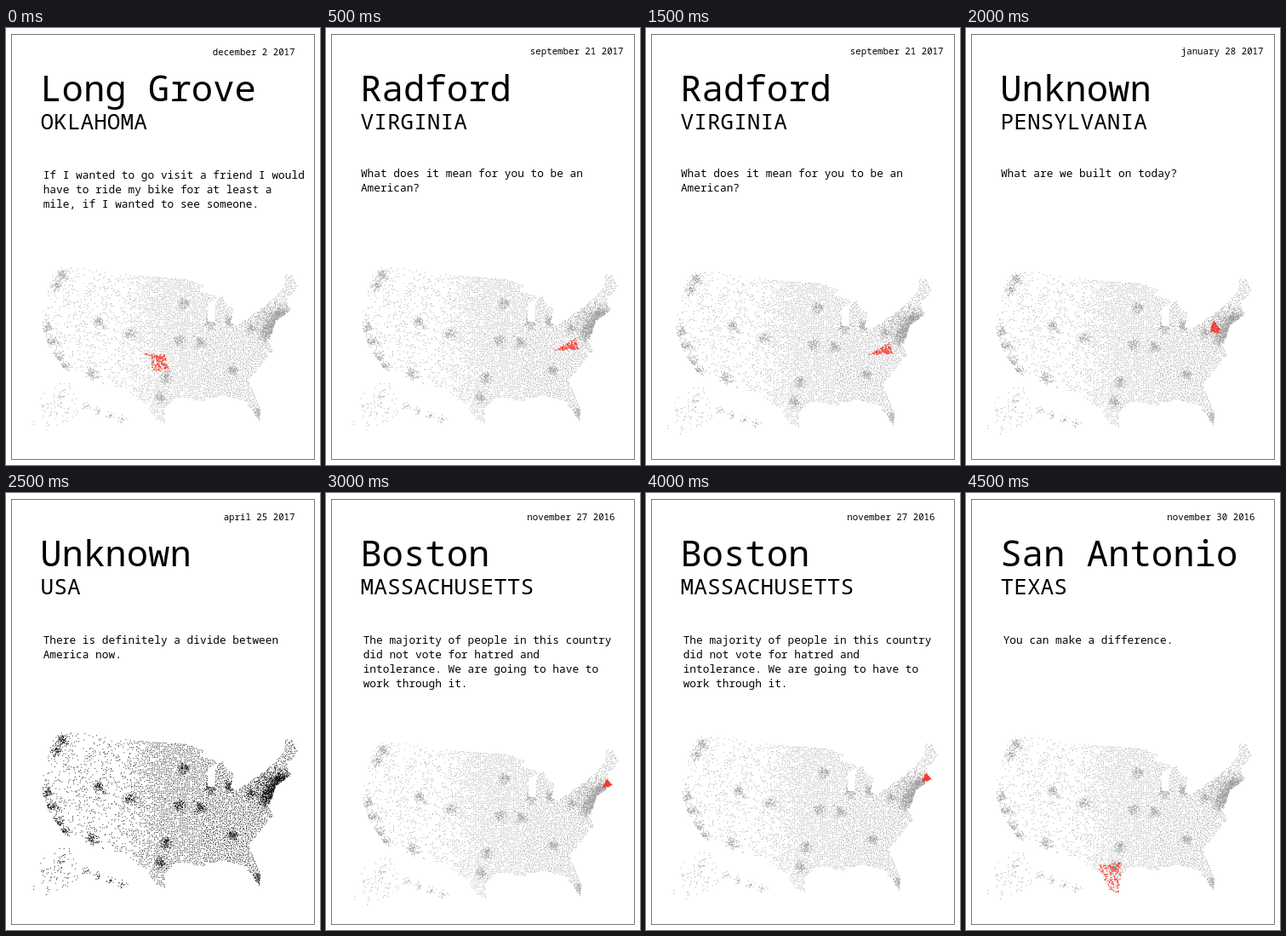
These frames come from a looping animation (369x513 px, 5 s). An HTML page with a canvas:

```html
<!DOCTYPE html>
<html lang="en">
<head>
<meta charset="utf-8">
<title>Map of voices</title>
<style>
  html, body { margin: 0; width: 100%; height: 100%; overflow: hidden; background: #fff; }
  #stage { position: relative; width: 369px; height: 513px; }
  canvas, svg { position: absolute; left: 0; top: 0; display: block; }
  text { font-family: "Noto Sans Mono", "DejaVu Sans Mono", monospace; fill: #000; white-space: pre; }
  #date { font-size: 10.75px; text-anchor: end; }
  #city { font-size: 42.3px; }
  #state { font-size: 26.1px; }
  #quote { font-size: 12.8px; }
</style>
</head>
<body>
<div id="stage">
  <canvas id="map" width="369" height="513"></canvas>
  <svg width="369" height="513" viewBox="0 0 369 513">
    <rect x="6.5" y="7.5" width="356" height="499" fill="none" stroke="#777"/>
    <text id="date"></text>
    <text id="city" x="40.2" y="86"></text>
    <text id="state" x="40.6" y="118.5"></text>
    <g id="quote"><text></text><text></text><text></text><text></text></g>
  </svg>
</div>
<script>
const W = 369, H = 513, STEP_MS = 500;

const LAND = new Path2D(`M70 278 L150 291 212 295 234 303 226 309 252 316 237 322 237 345 246 346
  246 328 249 318 255 315 262 327 267 330 264 346 272 349 298 331 314 318 327 304 328 291 334 288
  343 303 329 321 335 331 317 344 309 368 314 378 285 414 299 447 298 462 280 438 254 431 231 438
  200 433 186 447 187 464 178 460 160 440 140 424 100 414 68 400 48 370 43 350 44 330 53 290Z`);

const CITIES = [
  [66, 290], [60, 303], [48, 352], [55, 368], [60, 387], [68, 398], [109, 345], [146, 359],
  [102, 406], [209, 323], [203, 367], [188, 411], [182, 434], [228, 369], [240, 346],
  [264, 344], [265, 402], [288, 352], [297, 454]
];

const ISLANDS = [[64, 431, 6], [51, 453, 9], [72, 448, 7]];

// Each region: corner points and dot count.
const REGIONS = {
  oklahoma: ["M162 382 L186 383 193 404 172 402 171 386Z", 170],
  wisconsin: ["M222 333 L240 330 240 342 223 340Z", 110],
  pennsylvania: ["M298 338 L306 349 304 353 294 352Z", 140],
  massachusetts: ["M329 324 L335 331 324 334Z", 120],
  virginia: ["M269 379 L294 364 297 377Z", 130],
  texas: ["M162 432 L191 428 186 464 175 461Z", 170]
};

const VIRGINIA = {
  date: "september 21 2017", city: "Radford", state: "VIRGINIA", region: "virginia", at: [0, 0],
  question: true, quote: ["What does it mean for you to be an", "American?"]
};
const BOSTON = {
  date: "november 27 2016", city: "Boston", state: "MASSACHUSETTS", region: "massachusetts", at: [1, 12],
  quote: ["The majority of people in this country", "did not vote for hatred and",
          "intolerance. We are going to have to", "work through it."]
};

const CARDS = [
  { date: "december 2 2017", city: "Long Grove", state: "OKLAHOMA", region: "oklahoma", at: [0, 0],
    quote: ["If I wanted to go visit a friend I would", "have to ride my bike for at least a",
            "mile, if I wanted to see someone."] },
  VIRGINIA,
  { date: "april 26 2017", city: "Milwaukee", state: "WISCONSIN", region: "wisconsin", at: [-6, 10],
    quote: ["He is looking for whats best for the", "country as a whole."] },
  { ...VIRGINIA, at: [-7, 5] },
  { date: "january 28 2017", city: "Unknown", state: "PENSYLVANIA", region: "pennsylvania", at: [-7, 5],
    question: true, quote: ["What are we built on today?"] },
  { date: "april 25 2017", city: "Unknown", state: "USA", at: [0, 0],
    quote: ["There is definitely a divide between", "America now."] },
  BOSTON,
  VIRGINIA,
  { ...BOSTON, at: [0, 5] },
  { date: "november 30 2016", city: "San Antonio", state: "TEXAS", region: "texas", at: [-7, 5],
    quote: ["You can make a difference."] }
];

function seeded(seed) {
  return () => {
    seed = (seed * 16807) % 2147483647;
    return seed / 2147483647;
  };
}

function layer() {
  const c = document.createElement("canvas");
  c.width = W;
  c.height = H;
  return c.getContext("2d");
}

// Sparse and patchy in the west, an even lattice from the plains eastward.
function density(x, y) {
  const patch = Math.sin(x * 0.21 + 2 * Math.sin(y * 0.13)) * Math.sin(y * 0.17 + x * 0.05);
  const west = 0.21 + 0.17 * patch;
  const ramp = Math.min(1, Math.max(0, (x - 135) / 50));
  return west + ((x > 235 ? 0.92 : 0.8) - west) * ramp;
}

function drawCountry() {
  const g = layer(), rnd = seeded(7919);
  const onLand = (x, y) => g.isPointInPath(LAND, x, y);
  const dot = (x, y) => g.fillRect(x - 0.45, y - 0.45, 0.9, 0.9);
  const spread = r => (rnd() + rnd() + rnd() - 1.5) * 2 * r;
  const cluster = (cx, cy, r, n, clip = true) => {
    for (let i = 0; i < n; i++) {
      const x = cx + spread(r), y = cy + spread(r);
      if (!clip || onLand(x, y)) dot(x, y);
    }
  };
  const gap = 1.95;
  for (let v = 240; v < 470; v += gap) {
    for (let u = 40; u < 346; u += gap) {
      const jitter = u > 150 && u < 230 ? 0.8 : 1.6;
      const x = u + (rnd() - 0.5) * jitter;
      const y = v + (u - 40) * 0.06 + (rnd() - 0.5) * jitter;
      if (rnd() < density(x, y) && onLand(x, y)) dot(x, y);
    }
  }
  CITIES.forEach(([x, y]) => cluster(x, y, 3.4, 85));
  // Northeast corridor, then two island chains at the lower left.
  for (let t = 0; t <= 1; t += 0.1) cluster(327 - 23 * t, 331 + 31 * t, 5, 75);
  cluster(311, 341, 9, 260);
  ISLANDS.forEach(([x, y, r]) => cluster(x, y, r, 34, false));
  for (let i = 0; i < 4; i++) cluster(94 + i * 14.4, 444 + i * 5.2, 2.3, 18, false);
  return g.canvas;
}

function drawRegion([outline, count]) {
  const g = layer(), path = new Path2D(outline), rnd = seeded(count);
  const xy = outline.match(/\d+/g).map(Number);
  const range = k => {
    const v = xy.filter((_, i) => i % 2 === k);
    return [Math.min(...v), Math.max(...v)];
  };
  const [x0, x1] = range(0), [y0, y1] = range(1);
  g.fillStyle = "#f43a2c";
  for (let n = 0; n < count;) {
    const x = x0 + rnd() * (x1 - x0), y = y0 + rnd() * (y1 - y0);
    if (!g.isPointInPath(path, x, y)) continue;
    g.fillRect(x - 0.6, y - 0.6, 1.2, 1.2);
    n++;
  }
  return g.canvas;
}

const byId = id => document.getElementById(id);
const ctx = byId("map").getContext("2d");
const country = drawCountry();
const regions = {};
for (const name in REGIONS) regions[name] = drawRegion(REGIONS[name]);

function place(el, x, y, words) {
  el.setAttribute("x", x);
  el.setAttribute("y", y);
  el.textContent = words;
}

function show({ date, city, state, quote, question, at, region }) {
  place(byId("date"), question ? 349.5 : 339.5, question ? 31 : 32, date);
  byId("city").textContent = city;
  byId("state").textContent = state;
  [...byId("quote").children].forEach((line, i) =>
    place(line, question ? 40.9 : 43.7, (question ? 175 : 177) + i * 17, quote[i] || ""));

  ctx.clearRect(0, 0, W, H);
  ctx.globalAlpha = region ? 0.4 : 1;
  ctx.drawImage(country, ...at);
  ctx.globalAlpha = 1;
  if (region) ctx.drawImage(regions[region], ...at);
}

const start = performance.now();
let current = -1;

function tick() {
  const index = Math.floor((performance.now() - start) / STEP_MS) % CARDS.length;
  if (index !== current) show(CARDS[current = index]);
  requestAnimationFrame(tick);
}
tick();
</script>
</body>
</html>
```
